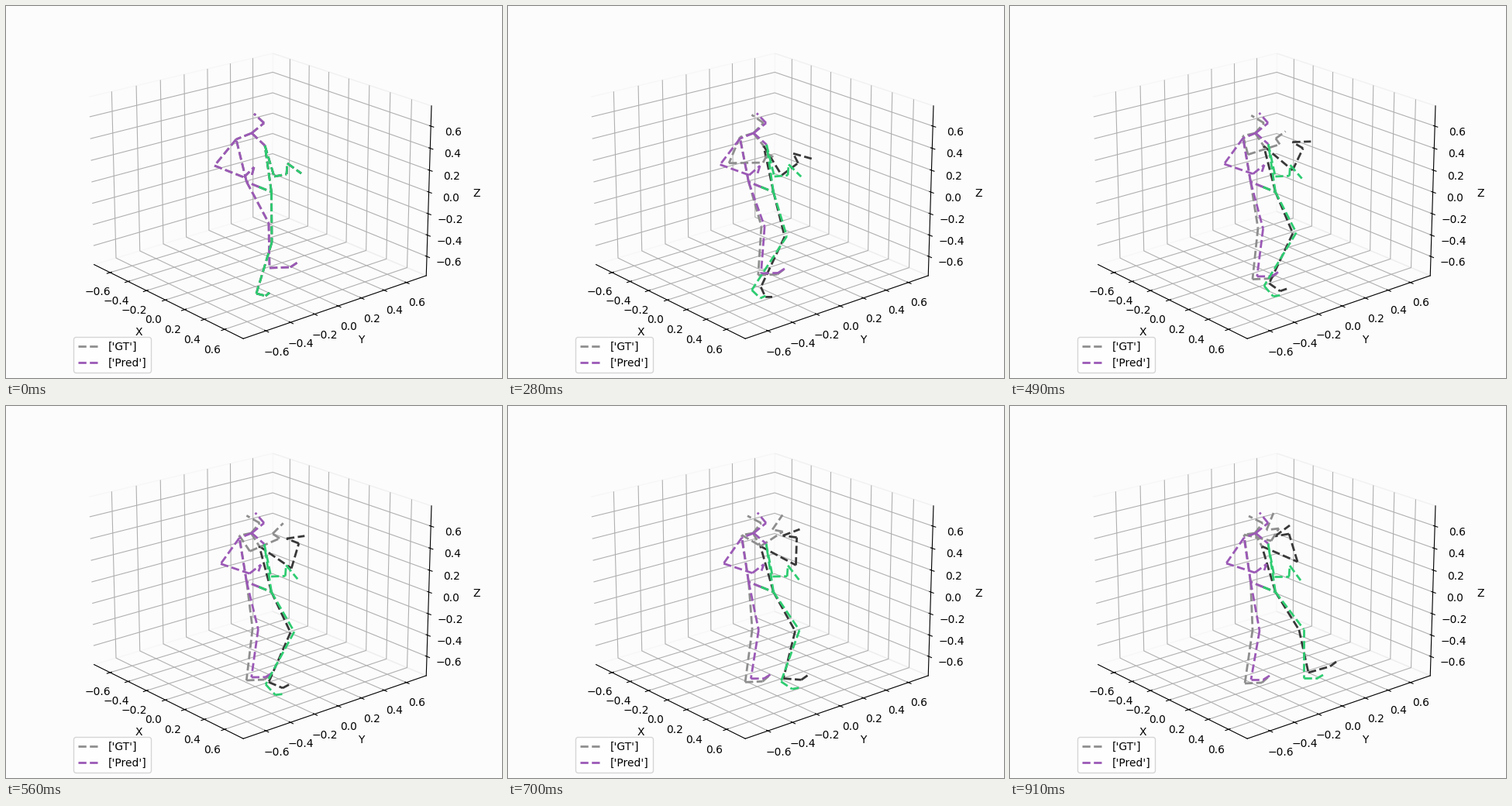
Recreate the animation shown at these times as a matplotlib script. Size 640 px wide and 480 px high, loop 980 ms.

```python
import numpy as np
import matplotlib.pyplot as plt
from matplotlib.animation import FuncAnimation
from matplotlib.lines import Line2D
from matplotlib.transforms import Affine2D

FRAMES, INTERVAL = 14, 70
PAPER = "#fcfcfc"
GRAY, DARK, PURPLE, GREEN = "#8e8e8e", "#383838", "#9b59b6", "#2ecc71"

# Both figures share this first pose. Joint positions are screen pixels with y
# pointing down; prefixes: l and r for the sides, m for the middle.
START = {
    "m_hip": (326.5, 233.5), "l_hip": (310.5, 227), "r_hip": (342.5, 240),
    "neck": (317, 164), "head": (333, 151), "crown": (320, 139),
    "l_shoulder": (297, 172), "l_elbow": (269, 206), "l_wrist": (307, 221),
    "l_thumb": (320, 208), "l_tip": (317, 219),
    "r_shoulder": (334, 180), "r_elbow": (346, 220), "r_wrist": (362, 217),
    "r_thumb": (363, 203), "r_tip": (381, 216),
    "l_knee": (339, 280), "l_ankle": (340, 338), "l_foot": (367, 337),
    "l_toe": (376, 331),
    "r_knee": (343, 305), "r_ankle": (323, 371), "r_foot": (335, 374),
    "r_toe": (340, 370),
}

# Where each joint goes next: one point is a single eased move,
# several points are passed at even steps of time.
TRUE_MOVES = {
    "neck": [(316, 164)], "head": [(326, 151)], "crown": [(308, 142)],
    "l_shoulder": [(302, 166)], "r_shoulder": [(325, 181)],
    "l_elbow": [(287, 202), (319, 185), (337, 174)],
    "l_wrist": [(331, 200), (355, 167), (347, 158)],
    "l_thumb": [(336, 189), (344, 162), (331, 160)],
    "l_tip": [(344, 192), (358, 146), (340, 138)],
    "r_elbow": [(354, 218), (370, 208), (371, 201)],
    "r_wrist": [(375, 201), (377, 174), (360, 165)],
    "r_thumb": [(368, 189), (360, 169), (342, 168)],
    "r_tip": [(392, 195), (383, 164), (361, 154)],
    "l_knee": [(313, 289)], "l_ankle": [(303, 358)],
    "l_foot": [(325, 357)], "l_toe": [(333, 350)],
    "r_knee": [(373, 289)],
    "r_ankle": [(327, 362), (343, 355), (385, 344)],
    "r_foot": [(333, 375), (363, 361), (413, 336)],
    "r_toe": [(342, 375), (371, 356), (421, 330)],
}
PRED_MOVES = {
    "crown": [(322, 137.5)],
    "l_shoulder": [(302, 170)], "r_shoulder": [(333, 177.5)],
    "l_elbow": [(279, 203)], "l_wrist": [(316, 215)],
    "l_thumb": [(331, 204)], "l_tip": [(328, 212)],
    "r_elbow": [(341, 220)], "r_wrist": [(360, 220)],
    "r_thumb": [(361, 206)], "r_tip": [(375, 225)],
    "l_knee": [(322, 290)], "l_ankle": [(311, 353)],
    "l_foot": [(327, 353)], "l_toe": [(335, 348)],
    "r_knee": [(379, 288)],
    "r_ankle": [(315, 366), (340, 358), (379, 351)],
    "r_foot": [(326, 377), (353, 371), (397, 351)],
    "r_toe": [(333, 374), (362, 370), (404, 347)],
}


def chain(side, *parts):
    names = [f"{side}_{p}" for p in parts]
    return [(a, b, side) for a, b in zip(names, names[1:])]


LEG = ("hip", "knee", "ankle", "foot", "toe")
ARM = ("hip", "shoulder", "elbow", "wrist", "thumb", "tip")
BONES = (chain("l", *LEG) + chain("r", *LEG)
         + [("m_hip", "l_hip", "l"), ("m_hip", "r_hip", "r")]
         + chain("r", *ARM) + chain("l", *ARM)
         + [("neck", "l_shoulder", "l"), ("neck", "r_shoulder", "l"),
            ("neck", "head", "l"), ("head", "crown", "l")])


def along(points, t):
    """Point on a path at time t from 0 to 1."""
    pts = np.array(points, float)
    last = len(pts) - 1
    if last == 0:
        return pts[0]
    if last == 1:
        return pts[0] + (pts[1] - pts[0]) * (1 - (1 - t) ** 1.7)
    slopes = np.gradient(pts, axis=0)
    slopes[[0, -1]] /= 2  # gentle start and stop
    i = min(int(t * last), last - 1)
    u = t * last - i
    return ((1 + 2 * u) * (1 - u) ** 2 * pts[i]
            + u * (1 - u) ** 2 * slopes[i]
            + u * u * (3 - 2 * u) * pts[i + 1]
            + u * u * (u - 1) * slopes[i + 1])


fig = plt.figure(figsize=(6.4, 4.8), dpi=100, facecolor=PAPER)
ax = fig.add_axes([0, 0, 1, 1], projection="3d", facecolor=PAPER)
ax.view_init(elev=20, azim=-40)
reach = 0.75 * 25 / 24
ax.set(xlim=(-reach, reach), ylim=(-reach, reach), zlim=(-reach, reach),
       xlabel="X", ylabel="Y", zlabel="Z")
for axis in (ax.xaxis, ax.yaxis, ax.zaxis):
    axis.pane.fill = False

dashed = dict(lw=2, ls="--")
ax.legend(handles=[Line2D([], [], color=GRAY, label="['GT']", **dashed),
                   Line2D([], [], color=PURPLE, label="['Pred']", **dashed)],
          loc="lower left")

screen = Affine2D().scale(1, -1).translate(0, 480)


def make_skeleton(left, right, moves):
    paths = {name: [start, *moves.get(name, [])]
             for name, start in START.items()}
    lines = [fig.add_artist(Line2D([], [], transform=screen,
                                   color=left if side == "l" else right,
                                   **dashed))
             for _, _, side in BONES]
    return paths, lines


skeletons = [make_skeleton(GRAY, DARK, TRUE_MOVES),
             make_skeleton(PURPLE, GREEN, PRED_MOVES)]


def update(frame):
    t = frame / (FRAMES - 1)
    for paths, lines in skeletons:
        pose = {name: along(path, t) for name, path in paths.items()}
        for line, (a, b, _) in zip(lines, BONES):
            line.set_data(*zip(pose[a], pose[b]))
    return [line for _, lines in skeletons for line in lines]


anim = FuncAnimation(fig, update, frames=FRAMES, interval=INTERVAL,
                     init_func=lambda: update(0), repeat=True, repeat_delay=0)
plt.show()
```
